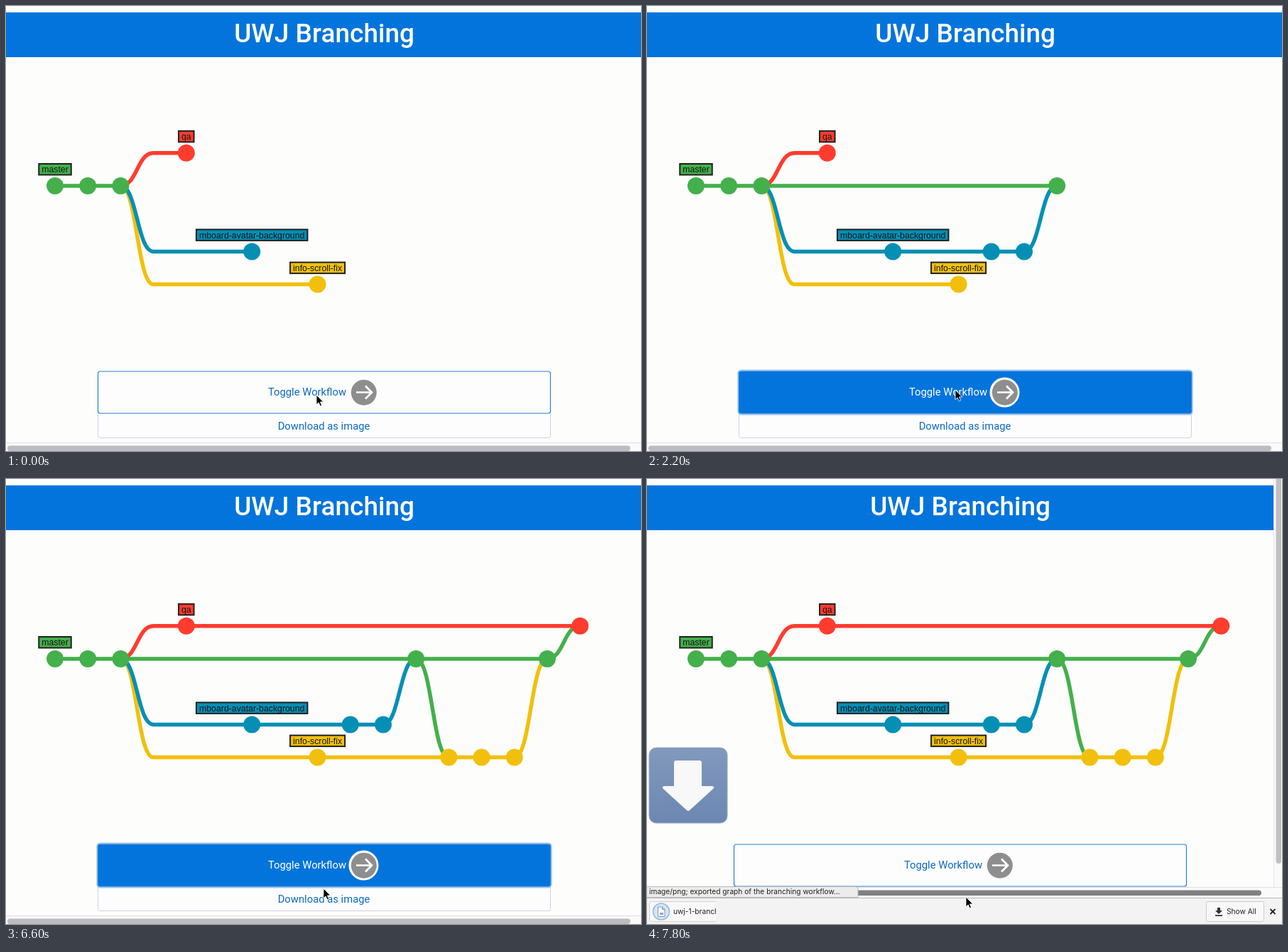
An HTML page for the animation above (8000 ms loop, 894 px wide and 626 px high).

```html
<!DOCTYPE html>
<html lang="en">
<head>
<meta charset="utf-8">
<title>Branching</title>
<style>
  html, body { margin: 0; width: 100%; height: 100%; overflow: hidden; background: #fdfdfc; }
  svg { display: block; width: 894px; height: 626px; }
  text { white-space: pre; }
  .title { font: 500 37px Roboto, sans-serif; fill: #fff; text-anchor: end; }
  .button { font: 14.8px Roboto, sans-serif; fill: #0b6ac2; text-anchor: middle; }
  .chrome { font: 10.2px Inter, sans-serif; fill: #222; }
  .label { font: 12.3px "Liberation Sans", Arial, sans-serif; fill: #151515; text-anchor: middle; }
  #links path { fill: none; stroke-width: 5.5; }
</style>
</head>
<body>
<svg viewBox="0 0 894 626">
  <rect width="894" height="626" fill="#fdfdfc"/>
  <rect id="header" y="9" width="894" height="63" fill="#0474dd"/>

  <g id="page">
    <text class="title" x="575" y="51">UWJ Branching</text>
    <path id="download" d="M129.5 573V604.5q0 3 3 3H763.5q3 0 3-3V573" stroke="#cfcfe6"/>
    <text id="downloadText" class="button" x="447.5" y="595.5">Download as image</text>
    <rect id="ring" x="128.5" y="512.8" width="639" height="61.4" rx="4" fill="none" stroke="#9cc8ee" stroke-width="2.5"/>
    <rect id="toggle" x="129.5" y="514" width="637" height="59" rx="3" stroke="#2b7fd3" stroke-width="1.2"/>
    <text id="toggleText" class="button" x="424" y="547.8">Toggle Workflow</text>
    <circle id="halo" cx="503.5" cy="543.5" r="21" fill="#fff"/>
    <circle cx="503.8" cy="543.7" r="18" fill="#8e8e8e"/>
    <path d="M493 543.5H514.5M506 534.5L515 543.5L506 552.5" fill="none" stroke="#fff" stroke-width="2.7"/>
  </g>

  <g id="links"></g>
  <g id="dots"></g>

  <g id="sidebar">
    <rect x="882" width="12" height="590" fill="#fafafa"/>
    <path d="M882.5 0V590" stroke="#e6e6ea"/>
    <rect x="885.5" y="-8" width="7.5" height="549" rx="3.7" fill="#c0c0c2"/>
  </g>

  <g id="bottom">
    <rect y="614" width="894" height="52" fill="#fafafa"/>
    <path d="M0 614.5H894" stroke="#dedeea"/>
    <rect id="thumb" x="2" y="618.5" width="877" height="7.5" rx="3.7"/>
    <g id="status">
      <path d="M-1 613.5H294q3 0 3 3V628.5H-1z" fill="#ececec" stroke="#b8b8b8"/>
      <text class="chrome" x="3" y="624.2">image/png; exported graph of the branching workflow...</text>
    </g>
    <g id="shelf">
      <rect y="629" width="894" height="40" fill="#f3f3f4"/>
      <path d="M0 629.5H894" stroke="#b9b9bb"/>
      <clipPath id="itemClip"><rect id="itemWidth" y="630" width="97" height="40"/></clipPath>
      <g clip-path="url(#itemClip)">
        <rect x="3.5" y="634.5" width="160" height="28" rx="3" fill="#f8f8f8" stroke="#d2d2d2"/>
        <circle cx="20" cy="648.5" r="11.5" fill="#d5e5f5" stroke="#91b7dd" stroke-width="1.5"/>
        <path d="M15.5 642H21.5L25 645.5V655.5H15.5zM21.5 642V645.5H25" fill="#fff" stroke="#7f94ad"/>
        <path d="M18 650H23V653H18z" fill="#8da9c8"/>
        <text class="chrome" x="37" y="652">uwj-1-branching.png</text>
      </g>
      <rect x="787.5" y="634.5" width="81" height="28" rx="2" fill="#f8f8f8" stroke="#cbcbcb"/>
      <path d="M803 643H807V647H810L805 652L800 647H803zM800 653.3H810V655H800z" fill="#333"/>
      <text class="chrome" x="816" y="652">Show All</text>
      <path d="M877.5 645L884.5 652M884.5 645L877.5 652" stroke="#222" stroke-width="1.8"/>
    </g>
  </g>

  <g id="arrow">
    <linearGradient id="steel" x2="0" y2="1">
      <stop stop-color="#8299bd"/><stop offset="1" stop-color="#6c87b2"/>
    </linearGradient>
    <rect x="3" width="110" height="106" rx="10" fill="url(#steel)" stroke="#90a4c5"/>
    <path d="M41 18H74q3 0 3 3V54H92q4 1 1 4L60 88q-2 2-4 0L23 58q-3-3 1-4H38V21q0-3 3-3z" fill="#f8f8f8"/>
  </g>

  <g id="cursor">
    <path id="pointer" d="M0 0V13.8L3.2 10.9L5.3 15.8L7.6 14.8L5.5 10H9.8z" fill="#000" stroke="#fff" stroke-width=".9"/>
    <path id="hand" d="M-2 0.8Q-.5-1 1 .8V5.5Q3 4 4 6Q6 5 6.5 7Q8.5 6.5 8.5 8.5V11L6.5 15H0L-4.5 9.5Q-5 7-2 8.5z" fill="#fff" stroke="#000" stroke-width="1.2"/>
  </g>
</svg>
<script>
const $ = id => document.getElementById(id);
const LOOP = 8000, TICK = 200, GAP = 46.2;

const master = { y: 253, color: '#43b04b' };
const qa = { y: 206.8, color: '#ff3c2e' };
const avatar = { y: 345.4, color: '#058fb5' };
const scroll = { y: 391.6, color: '#f2c00c' };

// [column, lane, previous column on the lane or branching point, merged column]
const history = [
  [0, master], [1, master, 0], [2, master, 1],
  [4, qa, 2], [6, avatar, 2], [8, scroll, 2],
  [9, avatar, 6], [10, avatar, 9], [11, master, 2, 10],
  [12, scroll, 8, 11], [13, scroll, 12], [14, scroll, 13],
  [15, master, 11, 14], [16, qa, 4, 15]
];
const laneAt = Object.fromEntries(history);
const columnX = column => 69 + GAP * column;

function add(parent, name, attributes, text = '') {
  const node = document.createElementNS('http://www.w3.org/2000/svg', name);
  for (const key in attributes) node.setAttribute(key, attributes[key]);
  node.textContent = text;
  parent.append(node);
  return node;
}

function link(from, to, color) {
  const x = columnX(from), y1 = laneAt[from].y, y2 = laneAt[to].y, mid = x + GAP / 2;
  const d = `M${x} ${y1}C${mid} ${y1} ${mid} ${y2} ${x + GAP} ${y2}H${columnX(to)}`;
  const path = add($('links'), 'path', { d, stroke: color });
  $('links').prepend(path);
  return path;
}

const commits = history.map(([column, lane, previous, merged]) => {
  const nodes = [add($('dots'), 'circle', { cx: columnX(column), cy: lane.y, r: 12, fill: lane.color })];
  if (previous !== undefined) nodes.push(link(previous, column, lane.color));
  if (merged !== undefined) nodes.push(link(merged, column, laneAt[merged].color));
  return { nodes, time: column < 9 ? 0 : 500 + 760 * (column - 9) };
});

function label(column, text, width) {
  const x = columnX(column), { y, color } = laneAt[column];
  add($('dots'), 'rect', {
    x: x - width / 2, y: y - 31, width, height: 15.5, fill: color, stroke: '#202020', 'stroke-width': 2
  });
  add($('dots'), 'text', { class: 'label', x, y: y - 18.7 }, text);
}
label(0, 'master', 45.5);
label(4, 'qa', 21.5);
label(6, 'mboard-avatar-background', 156.5);
label(8, 'info-scroll-fix', 77);

const clamp = v => Math.max(0, Math.min(1, v));
const show = (id, on) => $(id).style.display = on ? '' : 'none';
const set = (id, key, value) => $(id).setAttribute(key, value);
const move = (id, x, y) => set(id, 'transform', `translate(${x} ${y})`);

// [time, x, y]
const route = [[0, 437, 547], [200, 434, 540], [6200, 434, 540], [6600, 447, 576], [7000, 450, 589], [7400, 450, 589], [7600, 449, 588]];
function cursorAt(t) {
  const i = route.findIndex(([time]) => time > t);
  if (i < 0) return route.at(-1).slice(1);
  const [a, b] = [route[i - 1], route[i]], p = (t - a[0]) / (b[0] - a[0]);
  return [1, 2].map(k => a[k] + (b[k] - a[k]) * p);
}

function draw(t) {
  const pressed = t >= 200 && t < 6800;
  const hovering = t >= 6800 && t < 7600;
  const saving = t >= 7600;

  for (const { nodes, time } of commits)
    for (const node of nodes) node.style.display = t >= time ? '' : 'none';

  set('toggle', 'fill', pressed ? '#0474dd' : '#fdfdfd');
  $('toggleText').style.fill = pressed ? '#fff' : '';
  show('halo', pressed);
  show('ring', pressed || hovering);
  set('download', 'fill', hovering ? '#c9c9cf' : '#fdfdfd');
  $('downloadText').style.cssText = hovering ? 'fill:#01509a;text-decoration:underline' : '';

  move('page', saving ? -7 : 0, 0);
  set('header', 'width', saving ? 882 : 894);
  show('sidebar', saving);
  show('status', t >= 7000);
  show('shelf', saving);
  set('thumb', 'fill', saving ? '#808080' : '#bdbdc1');
  set('thumb', 'width', saving ? 863 : 877);
  move('bottom', 0, -40 * clamp((t - 7400) / 200));
  set('itemWidth', 'width', 97 * clamp((t - 7500) / 300));

  show('arrow', saving);
  move('arrow', 0, 378 - 0.2 * (7800 - t));
  set('arrow', 'opacity', clamp((t - 7500) / 300));

  move('cursor', ...cursorAt(t));
  show('pointer', !hovering);
  show('hand', hovering);
}

const start = performance.now();
function frame() {
  const t = (performance.now() - start) % LOOP;
  draw(Math.floor(t / TICK) * TICK);
  requestAnimationFrame(frame);
}
frame();
</script>
</body>
</html>
```
